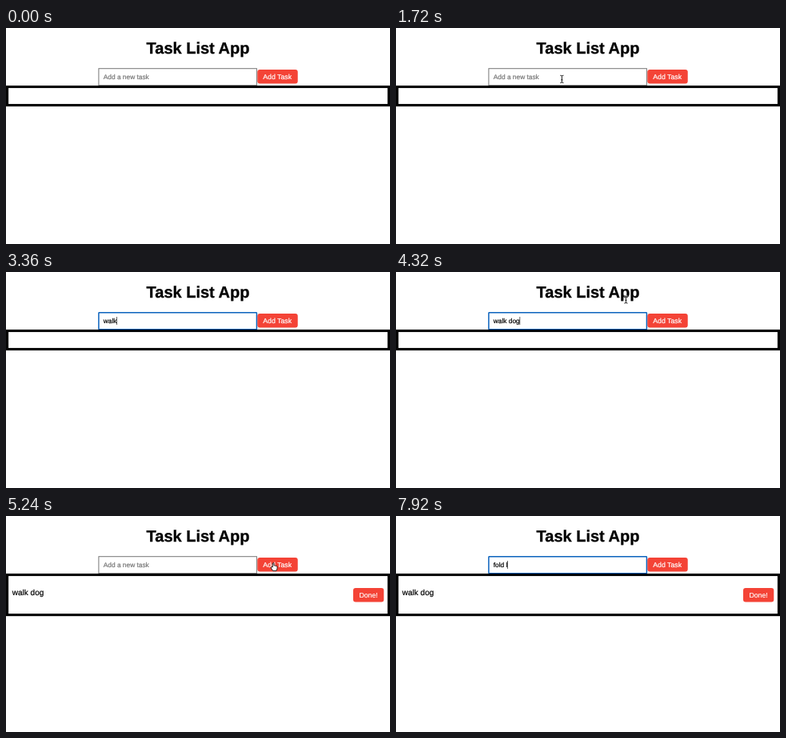
Animation, 480 px wide and 270 px high, one loop 8000 ms. Source, as an HTML page:

```html
<!DOCTYPE html>
<html lang="en">
<head>
<meta charset="utf-8">
<title>Task list</title>
<style>
  html, body { margin: 0; width: 100%; height: 100%; overflow: hidden; background: #fff; }
  svg { display: block; width: 480px; height: 270px; }
  text {
    font: 8.333px Arial, "Liberation Sans", sans-serif; white-space: pre; text-rendering: geometricPrecision;
    color: #000; fill: currentColor; stroke: currentColor; stroke-width: .2px;
  }
  .title { font-size: 20px; font-weight: bold; text-anchor: middle; stroke-width: .3px; }
  .task { font-size: 10px; }
  .button rect { fill: #f44336; }
  .button text { font-size: 8.75px; color: #fff; text-anchor: middle; }
  .hint { color: #757575; }
  #field { fill: #fff; stroke: #767676; stroke-width: 1; }
  #field.focused { stroke: #0b63bd; stroke-width: 1.5; rx: .7px; }
</style>
</head>
<body>
<svg viewBox="0 0 480 270">
  <text class="title" x="240" y="32">Task List App</text>
  <rect id="field" x="115.9" y="50.7" width="197.5" height="21"/>
  <text id="entry" x="121.8" y="64"></text>
  <rect id="caret" y="56" width=".6" height="10"/>
  <g class="button">
    <rect x="314.3" y="52" width="50.4" height="17.5" rx="3"/>
    <text x="339.2" y="64">Add Task</text>
  </g>
  <rect id="list" x="1.55" y="73.5" width="476.9" fill="none" stroke="#000" stroke-width="3.1"/>
  <g id="item">
    <text class="task" x="7.8" y="99.4">walk dog</text>
    <g class="button">
      <rect x="434" y="90" width="38.3" height="17.5" rx="3"/>
      <text x="453.1" y="101.7">Done!</text>
    </g>
  </g>
  <g id="pointer">
    <path id="arrow" d="M0 0V9.6L2.2 7.6 3.7 11 5.2 10.3 3.7 7.1H6.6Z" stroke="#fff" stroke-width=".7"/>
    <g id="beam" fill="none">
      <path id="bar" d="M-2-4.6Q0-4.6 0-3.4Q0-4.6 2-4.6M0-3.4V3.6M-2 4.8Q0 4.8 0 3.6Q0 4.8 2 4.8M-1 1H1" stroke="#fff" stroke-width="1.8"/>
      <use href="#bar" style="display:none"/>
      <path d="M-2-4.6Q0-4.6 0-3.4Q0-4.6 2-4.6M0-3.4V3.6M-2 4.8Q0 4.8 0 3.6Q0 4.8 2 4.8M-1 1H1" stroke="#000" stroke-width=".9"/>
    </g>
    <path id="hand" d="M-1.6 1V-4Q-.8-5.2 0-4V-1Q1-1.5 1.6-.7Q2.6-1.1 3-.3Q4-.4 4 .7V2.5L3 5.5H-1.4L-3.6 2Q-4 .4-2.8 .5Z" fill="#fff" stroke="#000" stroke-width=".8"/>
  </g>
</svg>
<script>
const $ = id => document.getElementById(id);
const show = (id, on) => $(id).style.display = on ? "" : "none";

const LOOP = 8000, KEY_GAP = 144, BLINK = 500;
const FOCUS = 1960, CLICK = 4960, ADDED = 5040, REFOCUS = 5840;
const words = [
  { text: "walk dog", start: 2840, end: ADDED },
  { text: "fold l", start: 7200, end: LOOP }
];

// The pointer glides along a curve, then rests until it is hidden or moves on.
const field = [203.3, 57.6], button = [335, 63], fieldEnd = [295.5, 60.6];
const moves = [
  { shown: 1040, start: 1240, stop: FOCUS, hidden: words[0].start, path: [[262, 208], [260, 143], field] },
  { shown: 4120, start: 4120, stop: 4920, hidden: 5400, path: [field, [285, 6], button] },
  { shown: 5400, start: 5400, stop: 5760, hidden: words[1].start, path: [button, [315, 62], fieldEnd] }
];

const easeOut = k => 1 - (1 - k) ** 3;
const curve = (a, b, c, k) => (1 - k) ** 2 * a + 2 * k * (1 - k) * b + k * k * c;

function pointerAt(t) {
  const move = moves.find(m => t >= m.shown && t < m.hidden);
  if (!move) return null;
  const progress = (t - move.start) / (move.stop - move.start);
  const k = easeOut(Math.min(1, Math.max(0, progress)));
  const [from, via, to] = move.path;
  return [0, 1].map(i => curve(from[i], via[i], to[i], k));
}

function shapeAt(x, y) {
  const inside = (l, t, r, b) => x > l && x < r && y > t && y < b;
  if (inside(314, 52, 365, 69.5)) return "hand";
  return inside(115, 50, 314, 72) || inside(176, 13, 304, 37) ? "beam" : "arrow";
}

function drawField(t) {
  const focused = t >= FOCUS && t < CLICK || t >= REFOCUS;
  $("field").classList.toggle("focused", focused);

  const word = words.find(w => t >= w.start && t < w.end);
  const entry = $("entry");
  entry.classList.toggle("hint", !word);
  let caretOn = false;
  if (word) {
    const count = Math.min(word.text.length, Math.floor((t - word.start) / KEY_GAP) + 1);
    const idle = t - word.start - (count - 1) * KEY_GAP;
    entry.textContent = word.text.slice(0, count);
    caretOn = focused && idle % (2 * BLINK) < BLINK;
    $("caret").setAttribute("x", 121.7 + entry.getComputedTextLength());
  } else {
    entry.textContent = "Add a new task";
  }
  show("caret", caretOn);
}

function draw(t) {
  drawField(t);
  $("list").setAttribute("height", t >= ADDED ? 50.1 : 23);
  show("item", t >= ADDED);

  const at = pointerAt(t);
  show("pointer", at);
  if (at) {
    $("pointer").setAttribute("transform", `translate(${at})`);
    const shape = shapeAt(...at);
    for (const id of ["arrow", "beam", "hand"]) show(id, id === shape);
  }
}

function tick() {
  draw(performance.now() % LOOP);
  requestAnimationFrame(tick);
}
tick();
</script>
</body>
</html>
```
